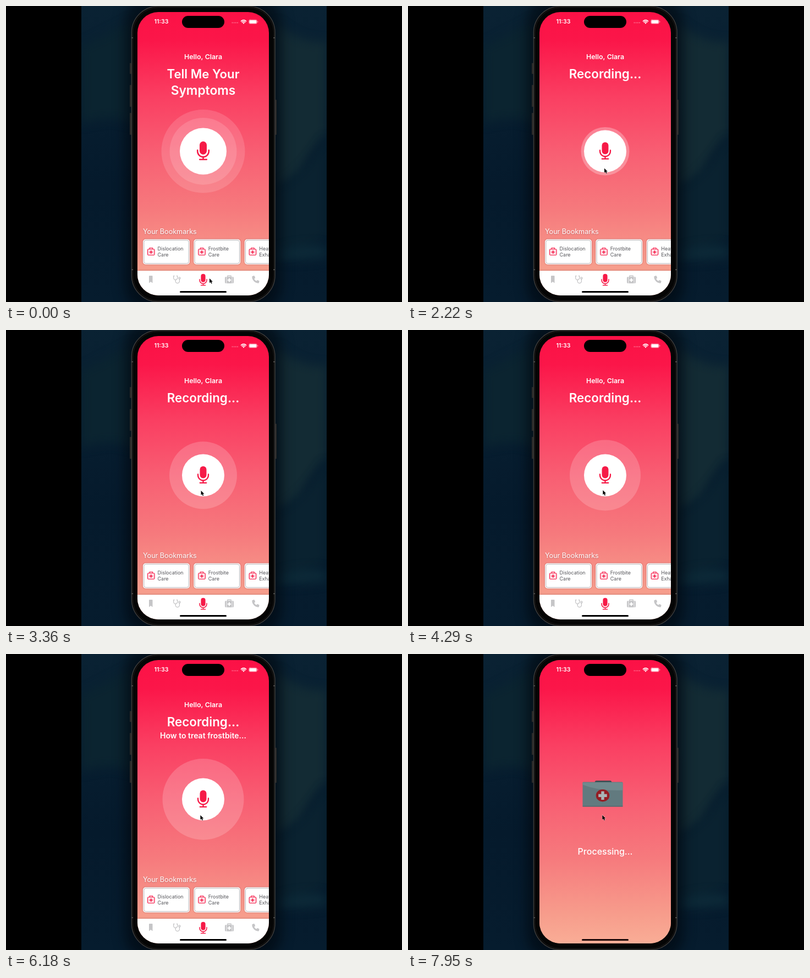
Animation, 720 px wide and 540 px high, one loop 8000 ms. Source, as an HTML page with a canvas:

```html
<!DOCTYPE html>
<html lang="en">
<head>
<meta charset="utf-8">
<title>Symptom recorder</title>
<style>
html, body { margin: 0; width: 100%; height: 100%; overflow: hidden; background: #000; }
canvas { display: block; width: 720px; height: 540px; }
</style>
</head>
<body>
<canvas id="stage" width="720" height="540"></canvas>
<script>
const ctx = document.getElementById('stage').getContext('2d');
const LOOP = 8000, CX = 358.5, CY = 265;
const PRESS = 1560, FADE = [6840, 7080];
const RED = '#f61a47', GREY = '#c5c5c7';

// [time, value...] points, eased from one to the next
const CURSOR = [[480, 370, 497], [1230, 357.5, 297], [1650, 357, 296], [2250, 357, 296],
  [2900, 354.6, 293], [5200, 354.2, 292], [6100, 353.4, 294]];
const RING = [[PRESS, 76, .2], [1760, 45, .28], [2220, 44, .28], [2600, 52, .22], [3000, 57, .2],
  [3360, 61.5, .18], [3800, 60, .18], [4290, 64.5, .18], [4700, 69, .2], [5310, 77, .28],
  [5700, 75, .22], [6180, 74, .18], [6700, 66, .18]];
const SPEECH = [[4860, 'How to...'], [5070, 'How to treat...'], [5760, 'How to treat frostbite...']];

const clamp = v => Math.min(1, Math.max(0, v));
const ease = p => p * p * (3 - 2 * p);
const lerp = (a, b, p) => a + (b - a) * p;

function sample(keys, t) {
  const n = keys.findIndex(k => k[0] > t);
  if (n === 0) return keys[0].slice(1);
  if (n < 0) return keys[keys.length - 1].slice(1);
  const a = keys[n - 1], b = keys[n], p = ease((t - a[0]) / (b[0] - a[0]));
  return a.slice(1).map((v, i) => lerp(v, b[i + 1], p));
}

function gradient(y0, y1, stops) {
  const g = ctx.createLinearGradient(0, y0, 0, y1);
  stops.forEach(([p, c]) => g.addColorStop(p, c));
  return g;
}

const SKY = gradient(0, 540, [[0, '#0a2233'], [.25, '#081f31'], [.6, '#051a2c'], [1, '#061c2e']]);
const ROSE = gradient(11, 528, [[0, '#fc1146'], [.1, '#fb1649'], [.3, '#fa3f62'],
  [.5, '#f85f73'], [.7, '#f67a7d'], [.9, '#f79d8c'], [1, '#f9ad96']]);

function box(x, y, w, h, r, fill, stroke, width = 1) {
  ctx.beginPath();
  ctx.roundRect(x, y, w, h, r);
  if (fill) { ctx.fillStyle = fill; ctx.fill(); }
  if (stroke) { ctx.strokeStyle = stroke; ctx.lineWidth = width; ctx.stroke(); }
}

function disc(x, y, r, fill) {
  ctx.beginPath();
  ctx.arc(x, y, r, 0, 7);
  ctx.fillStyle = fill;
  ctx.fill();
}

function line(d, color, width) {
  ctx.strokeStyle = color;
  ctx.lineWidth = width;
  ctx.lineCap = ctx.lineJoin = 'round';
  ctx.stroke(new Path2D(d));
}

function shape(d, fill) {
  ctx.fillStyle = fill;
  ctx.fill(new Path2D(d));
}

function at(x, y, scale, draw) {
  ctx.save();
  ctx.translate(x, y);
  ctx.scale(scale, scale);
  draw();
  ctx.restore();
}

function text(str, x, y, size, weight, color = '#fff', align = 'center') {
  ctx.font = `${weight} ${size}px Inter, "Open Sans", sans-serif`;
  ctx.textAlign = align;
  ctx.fillStyle = color;
  ctx.fillText(str, x, y);
}

function cross(x, y, size, width, color) {
  ctx.fillStyle = color;
  ctx.fillRect(x - size / 2, y - width / 2, size, width);
  ctx.fillRect(x - width / 2, y - size / 2, width, size);
}

function backdrop() {
  ctx.fillStyle = '#000';
  ctx.fillRect(0, 0, 720, 540);
  ctx.save();
  ctx.beginPath();
  ctx.rect(137, 0, 446, 540);
  ctx.clip();
  ctx.fillStyle = SKY;
  ctx.fillRect(137, 0, 446, 540);
  ctx.filter = 'blur(9px)';
  shape('M137 75 Q175 55 235 25 V215 Q190 195 137 215Z', '#0b2430');
  shape('M490 30 Q535 70 583 65 V230 Q560 250 535 305 Q515 325 490 330Z', '#132b34');
  shape('M490 330 Q530 320 583 240 V420 Q540 455 490 450Z', '#0a2230');
  shape('M490 450 Q535 430 583 440 V458 Q530 466 490 462Z', '#0d2a38');
  ctx.filter = 'blur(11px)';
  box(216, -20, 285, 580, 50, 'rgba(0,5,12,.6)');
  ctx.filter = 'none';
  ctx.restore();
}

function phone() {
  [[225, 104, 20], [225, 144, 40], [225, 195, 40], [489, 171, 64]]
    .forEach(([x, y, h]) => box(x, y, 3, h, 1, '#2b2a29'));
  box(228.5, .5, 260.5, 539, 48, '#050505', '#3d3c3b', 1.5);
  box(230.8, 2.8, 256, 534.5, 46, null, '#1c1b1b');
  ctx.fillStyle = '#4a4948';
  [[228, 57], [486, 57], [228, 480], [486, 480]].forEach(([x, y]) => ctx.fillRect(x, y, 3, 2));
}

function mic(x, y, scale) {
  at(x, y, scale, () => {
    box(-6.5, -18, 13, 24, 6.5, RED);
    line('M-10.3 -2 V0 A10.3 10.3 0 0 0 10.3 0 V-2 M0 10.5 V14.5 M-6.3 15 H6.3', RED, 2.5);
  });
}

function statusBar() {
  text('11:33', 282.5, 32.3, 10.6, 600);
  box(320, 18, 77, 22, 11, '#000');
  for (let i = 0; i < 4; i++) disc(411.5 + i * 3.2, 30.5, .9, 'rgba(255,255,255,.45)');
  line('M427.5 27.6 Q432 23.6 436.5 27.6 M429.3 29.6 Q432 27.2 434.7 29.6', '#fff', 1.6);
  disc(432, 31.3, 1.2, '#fff');
  box(441.5, 25, 15, 7.5, 2.2, null, 'rgba(255,255,255,.5)', .7);
  box(442.4, 25.8, 13.2, 5.9, 1.5, '#fff');
  box(457.3, 27.4, 1, 2.6, .5, 'rgba(255,255,255,.6)');
}

function card(x, top, bottom) {
  ctx.shadowColor = 'rgba(90,20,30,.35)';
  ctx.shadowBlur = 3;
  box(x, 425.5, 85, 46, 5, '#fff');
  ctx.shadowBlur = 0;
  box(x + 1.8, 427.3, 81.4, 42.4, 3.5, null, '#a9a3a6', .8);
  box(x + 8.5, 443.5, 12.5, 11, 1.8, '#fde0e6', RED, 1.2);
  line(`M${x + 12} 443 V441.3 H${x + 17.5} V443`, RED, 1.1);
  cross(x + 14.7, 449, 6, 1.5, RED);
  text(top, x + 26.5, 445.5, 9, 400, '#55555a', 'left');
  text(bottom, x + 26.5, 457, 9, 400, '#55555a', 'left');
}

function tabBar() {
  ctx.shadowColor = 'rgba(100,30,40,.35)';
  ctx.shadowBlur = 4;
  ctx.fillStyle = '#fff';
  ctx.fillRect(239, 483, 239, 46);
  ctx.shadowBlur = 0;
  shape('M260 493 Q260 492 261 492 H265.5 Q266.5 492 266.5 493 V505.5 L263.2 503 L260 505.5Z', GREY);
  line('M306 492.5 H304.7 V496 A3.5 3.5 0 0 0 311.7 496 V492.5 H310.4 M308.2 499.5 V502 A3.6 3.6 0 0 0 315.4 502 V498', GREY, 1.3);
  ctx.beginPath();
  ctx.arc(315.4, 496.4, 1.6, 0, 7);
  ctx.stroke();
  mic(CX, 500, .63);
  line('M402.8 494 V492.3 H409.2 V494', GREY, 1.4);
  box(398, 494, 16, 12, 2, GREY);
  ctx.fillStyle = '#fff';
  ctx.fillRect(400.5, 494, .8, 12);
  ctx.fillRect(410.7, 494, .8, 12);
  cross(406, 500, 6.6, 2.2, '#fff');
  shape('M448 493 L450.7 492.1 Q451.5 492 451.9 492.7 L453 495.4 Q453.2 496.1 452.6 496.7 L451.2 497.8 Q452.5 500.4 455.2 501.8 L456.4 500.4 Q456.9 499.9 457.6 500.2 L460 501.3 Q460.7 501.7 460.5 502.5 L459.8 505 Q459.6 505.7 458.8 505.7 Q453.5 505.5 450.2 501.5 Q447.2 498.3 447.3 493.9 Q447.4 493.2 448 493Z', GREY);
}

function recorder(t) {
  const live = t >= PRESS;
  text('Hello, Clara', CX, 97, 12.4, 600);
  if (live) {
    text('Recording...', CX, 131.7, 22.4, 600);
    const said = SPEECH.filter(s => s[0] <= t).pop();
    if (said) text(said[1], CX, 154, 14, 600);
    const [r, a] = sample(RING, t);
    disc(CX, CY, r, `rgba(255,255,255,${a})`);
  } else {
    text('Tell Me Your', CX, 131.7, 22.2, 600);
    text('Symptoms', CX, 162, 22.8, 600);
    disc(CX, CY, 76, 'rgba(255,255,255,.14)');
    disc(CX, CY, 61, 'rgba(255,255,255,.14)');
  }
  const p = ease(clamp((t - PRESS) / 180));
  disc(CX, CY, lerp(42.5, 38.5, p), '#fff');
  mic(CX, CY, lerp(1, .92, p));

  ctx.shadowColor = 'rgba(110,30,40,.4)';
  ctx.shadowBlur = 2;
  ctx.shadowOffsetY = 1;
  text('Your Bookmarks', 249, 415.7, 12.6, 400, '#fff', 'left');
  ctx.shadowBlur = ctx.shadowOffsetY = 0;
  ctx.shadowColor = 'transparent';
  card(249, 'Dislocation', 'Care');
  card(341.3, 'Frostbite', 'Care');
  card(433.7, 'Heat', 'Exhaustion');
  tabBar();
}

function kit(t) {
  const swing = Math.sin((t - 7950) / 900 * Math.PI * 2);
  ctx.save();
  ctx.translate(354, 255.5 - swing * 2);
  ctx.rotate(swing * .012);
  line('M-13 -19 V-21 Q-13 -23 -11 -23 H13 Q15 -23 15 -21 V-19', '#3d4a50', 2.8);
  box(-36.5, -22, 73, 45, 1.5, '#627a7f');
  shape('M-36.5 -21 H36.5 V-7 Q-6 -5 -36.5 -17Z', '#708a8e');
  ctx.fillStyle = '#536a6f';
  ctx.fillRect(-36.5, 21.5, 73, 1.5);
  ctx.beginPath();
  ctx.ellipse(0, 2.7, 12.3, 11.2, 0, 0, 7);
  ctx.fillStyle = '#941d23';
  ctx.fill();
  cross(0, 2.7, 15.5, 5.4, '#a9b5b6');
  ctx.restore();
}

function pointer(t) {
  const [x, y] = sample(CURSOR, t);
  at(x, y, 1, () => {
    const d = 'M0 0 V8.2 L1.9 6.5 L3.2 9.6 L4.7 9 L3.4 6 H5.8Z';
    line(d, 'rgba(255,255,255,.55)', 1);
    shape(d, '#000');
  });
}

function render(t) {
  backdrop();
  phone();
  ctx.save();
  ctx.beginPath();
  ctx.roundRect(239, 11, 239, 517, 38);
  ctx.clip();
  ctx.fillStyle = ROSE;
  ctx.fillRect(239, 11, 239, 517);
  if (t < FADE[1]) recorder(t);
  const p = ease(clamp((t - FADE[0]) / (FADE[1] - FADE[0])));
  if (p > 0) {
    ctx.globalAlpha = p;
    ctx.fillStyle = ROSE;
    ctx.fillRect(239, 11, 239, 517);
    kit(t);
    text('Processing...', CX, 365.7, 16, 500);
    ctx.globalAlpha = 1;
  }
  statusBar();
  box(316, 520, 85, 3, 1.5, p > .5 ? '#1c0808' : '#000');
  ctx.restore();
  pointer(t);
}

const start = performance.now();
function tick() {
  render((performance.now() - start) % LOOP);
  requestAnimationFrame(tick);
}
tick();
</script>
</body>
</html>
```
